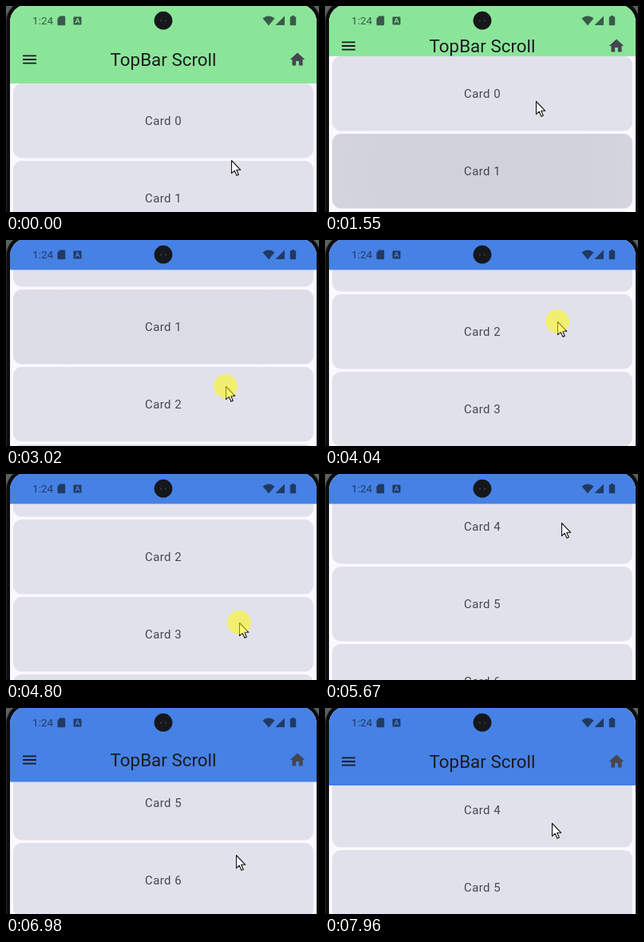
An HTML page that plays this animation: 392 by 258 pixels, repeating every 8000 ms.

```html
<!DOCTYPE html>
<html lang="en">
<head>
<meta charset="utf-8">
<title>TopBar Scroll</title>
<style>
  html, body { margin: 0; width: 100%; height: 100%; overflow: hidden; background: #59635f; }
  svg { display: block; width: 392px; height: 258px; }
  text { font-family: Roboto, sans-serif; }
  .card rect { fill: #e1e1ec; }
  .card text { font-size: 14.95px; letter-spacing: .47px; text-anchor: middle; fill: #45464f; }
  .title { font-size: 22.4px; text-anchor: middle; fill: #1b1b1f; }
  .status { fill: #111a24; opacity: .68; }
  .status text { font-size: 13.6px; }
</style>
</head>
<body>
<svg viewBox="0 0 392 258">
  <defs>
    <clipPath id="screen"><rect x="5" y="-2" width="384" height="300" rx="22"/></clipPath>
    <clipPath id="barClip"><rect id="barClipBox" x="5" y="37" width="384"/></clipPath>
    <radialGradient id="rippleFill" gradientUnits="userSpaceOnUse" cx="197" cy="46" r="190">
      <stop offset=".66" stop-color="#45464f"/>
      <stop offset="1" stop-color="#45464f" stop-opacity=".8"/>
    </radialGradient>
  </defs>

  <rect y="-7" width="394" height="310" rx="27" fill="#0b0c0e" stroke="#3c4144"/>

  <g clip-path="url(#screen)">
    <rect width="392" height="258" fill="#fbf8ff"/>
    <g id="list"></g>
    <rect id="bar" width="392"/>
    <g clip-path="url(#barClip)">
      <g id="barContent">
        <path transform="translate(18.3 55.8) scale(.934)" fill="#1b1b1f" d="M3 18h18v-2H3zM3 13h18v-2H3zM3 6v2h18V6z"/>
        <text class="title" x="197" y="75">TopBar Scroll</text>
        <path transform="translate(353.8 55.8) scale(.934)" fill="#45464f" d="M10 20v-6h4v6h5v-8h3L12 3 2 12h3v8z"/>
      </g>
    </g>
    <g class="status">
      <text x="33" y="23">1:24</text>
      <path d="M67.5 12.5H73q1.2 0 1.2 1.2V23q0 1.2-1.2 1.2h-7.3q-1.2 0-1.2-1.2v-7.3z"/>
      <path fill-rule="evenodd" d="M85.5 13.5h8q1 0 1 1v8q0 1-1 1h-8q-1 0-1-1v-8q0-1 1-1zM88.8 15.3 86.5 21.6h1.3l.5-1.5h2.5l.5 1.5h1.3l-2.3-6.3zM88.7 19l.85-2.5.85 2.5z"/>
      <path d="M321.5 15.5Q329 9.5 336.5 15.5L329 24.5z"/>
      <path d="M349 12.5V24H337.5z"/>
      <path d="M358 12h3v1.3h1.2q1 0 1 1v9q0 1-1 1h-5.4q-1 0-1-1v-9q0-1 1-1H358z"/>
    </g>
    <circle cx="197" cy="18.2" r="11.4" fill="#15171b"/>
    <path d="M193 18.5h2M199 18.5h2" stroke="#343a3d" stroke-width="2"/>
  </g>

  <g id="pointer">
    <path d="M.5.5V16.6L4.2 13.1 6.9 19.3 9.3 18.2 6.7 12.3H11.8z" fill="#fff" stroke="#111" stroke-width="1.1" stroke-linejoin="round"/>
    <circle id="press" r="15" fill="#fffa00" fill-opacity=".52"/>
  </g>
</svg>

<script>
const LOOP = 8000, STATUS = 37.4, BAR = 59.6, PITCH = 97;
const GREEN = [139, 229, 153], BLUE = [70, 129, 229];
const byId = id => document.getElementById(id);

// The list scrolls up in three swipes, then back down from the turning point.
const TURN = 6216, PEAK = 565;
const swipes = [
  { from: 1150, to: 2350, by: 131 },
  { from: 2950, to: 4250, by: 99 },
  { from: 4700, to: TURN, by: 335 },
  { from: TURN, to: TURN + 2000, by: -168.6 },
];

const pointerMoves = [
  { from: 440, to: 800, dx: -18, dy: 11 },
  { from: 950, to: 1540, dx: 0, dy: -85, pressed: true },
  { from: 1800, to: 2700, dx: 10, dy: 68 },
  { from: 2850, to: 4250, dx: 18, dy: -90, pressed: true },
  { from: 4300, to: 4700, dx: 0, dy: 90 },
  { from: 4750, to: 5600, dx: 4, dy: -126, pressed: true },
  { from: 6100, to: 6960, dx: -8, dy: 123, pressed: true },
  { from: 7200, to: 7960, dx: -4, dy: -40 },
];

function ease(t, from, to) {
  const u = Math.min(1, Math.max(0, (t - from) / (to - from)));
  return u * u * (3 - 2 * u);
}

const travel = (moves, key, t) =>
  moves.reduce((sum, move) => sum + move[key] * ease(t, move.from, move.to), 0);

function cardMarkup(index) {
  const box = 'x="9" width="376" height="93.4" rx="11"';
  const overlay = index === 1 ? `<rect id="ripple" ${box} style="fill:url(#rippleFill)"/>` : '';
  return `<g class="card" transform="translate(0 ${97 + index * PITCH})">
    <rect ${box}/>${overlay}<text x="197" y="52.3">Card ${index}</text></g>`;
}
byId('list').innerHTML = Array.from({ length: 9 }, (_, i) => cardMarkup(i)).join('');

function draw(t) {
  const offset = travel(swipes, 'by', t);
  const height = t < TURN ? Math.max(0, BAR - offset) : Math.min(BAR, PEAK - offset);
  const blueness = ease(t, 1800, 2240);
  const color = GREEN.map((g, i) => Math.round(g + (BLUE[i] - g) * blueness));
  const x = Math.round(282 + travel(pointerMoves, 'dx', t));
  const y = Math.round(193 + travel(pointerMoves, 'dy', t));
  const pressed = pointerMoves.some(m => m.pressed && t >= m.from && t < m.to);

  byId('list').setAttribute('transform', `translate(0 ${-Math.round(offset)})`);
  byId('ripple').setAttribute('opacity', .1 * ease(t, 1150, 1500) * (1 - ease(t, 1900, 3700)));
  byId('bar').setAttribute('height', STATUS + height);
  byId('bar').setAttribute('fill', `rgb(${color})`);
  byId('barClipBox').setAttribute('height', height);
  byId('barContent').setAttribute('transform', `translate(0 ${Math.round((height - BAR) / 2)})`);
  byId('pointer').setAttribute('transform', `translate(${x} ${y})`);
  byId('press').setAttribute('visibility', pressed ? 'visible' : 'hidden');
}

const start = performance.now();
function tick() {
  draw((performance.now() - start) % LOOP);
  requestAnimationFrame(tick);
}
tick();
</script>
</body>
</html>
```
